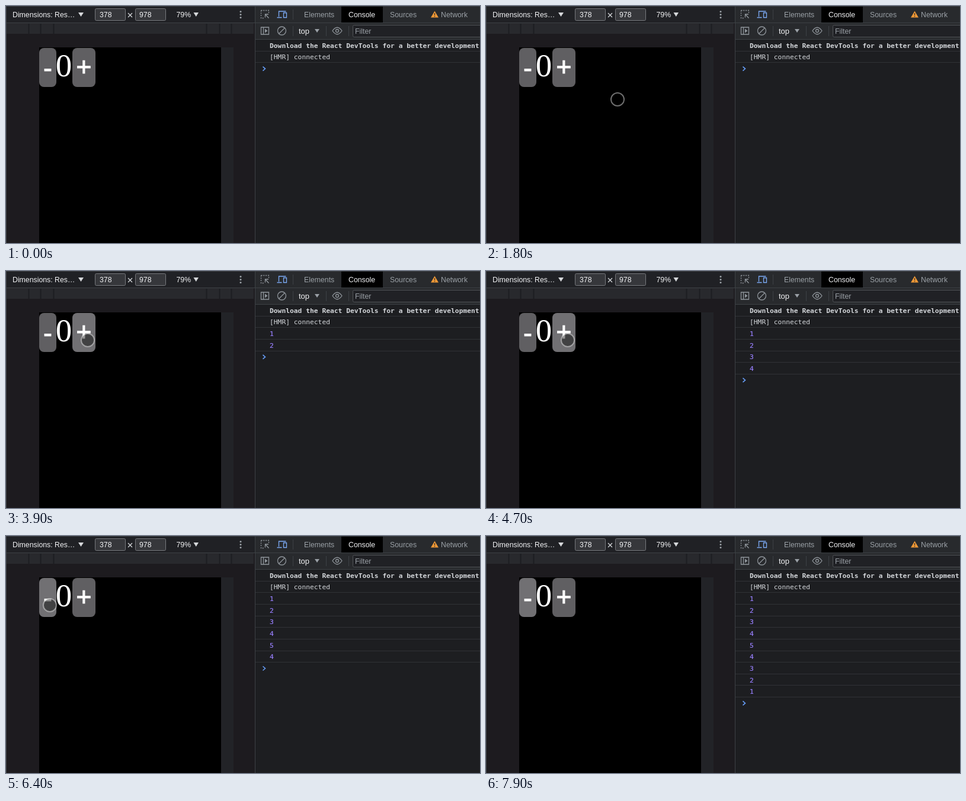
An HTML page that plays this animation: 800x401 px, repeating every 8 s.

```html
<!DOCTYPE html>
<html lang="en">
<head>
<meta charset="utf-8">
<title>Counter with console</title>
<style>
  html, body { margin: 0; width: 100%; height: 100%; overflow: hidden; background: #1d1b1f; }
  svg { display: block; width: 800px; height: 401px; }
  text { font: 12.3px "Liberation Sans", Arial, sans-serif; fill: #f1f2f4; white-space: pre; }
  .dim { fill: #9aa0a6; }
  .mono { font: 11.3px "DejaVu Sans Mono", monospace; fill: #d3d6da; }
  .bold { font-weight: bold; }
  .num { fill: #9980ff; stroke: #9980ff; stroke-width: .2; }
  .count { font: 55px "Liberation Serif", serif; fill: #fff; text-anchor: middle; }
  .sign { font-size: 45px; fill: #fff; stroke: #fff; stroke-width: .9; text-anchor: middle; }
  .line { stroke: #3d4145; fill: none; }
  .row { stroke: #303236; }
  .icon { stroke: #8f959b; stroke-width: 1.3; fill: none; }
  .blue { stroke: #7cacf8; }
</style>
</head>
<body>
<svg viewBox="0 0 800 401">
  <!-- device panel -->
  <rect width="420" height="401" fill="#1d1b1f"/>
  <rect width="420" height="29" fill="#202125"/>
  <rect y="29" width="418" height="18" fill="#28292d"/>
  <path d="M38.5 30v17M58.5 30v17M80.5 30v17M338.5 30v17M360.5 30v17M380.5 30v17" stroke="#1d1e22" stroke-width="2"/>
  <path class="line" d="M0 28.5H420M.5 0V401"/>
  <text x="11" y="19">Dimensions: Res…</text>
  <path d="M122 11h9l-4.5 7zM316.5 11h8.5l-4.25 7z" fill="#d5d7da"/>
  <g fill="#36373b" stroke="#77797d">
    <rect x="150.5" y="4.5" width="51" height="20" rx="2"/>
    <rect x="218.5" y="4.5" width="51" height="20" rx="2"/>
  </g>
  <text x="158" y="19">378</text>
  <text x="225" y="19">978</text>
  <path d="M206 12l7 7m0-7l-7 7" stroke="#d5d7da" stroke-width="1.3"/>
  <text x="287.5" y="19">79%</text>
  <g fill="#9aa0a6">
    <circle cx="396" cy="9.5" r="1.5"/><circle cx="396" cy="14.5" r="1.5"/><circle cx="396" cy="19.5" r="1.5"/>
  </g>

  <!-- page -->
  <rect x="56" y="70" width="307" height="331"/>
  <rect x="363" y="70" width="21" height="331" fill="#222327"/>
  <rect id="minus" x="56" y="71" width="29" height="66" rx="8"/>
  <rect id="plus" x="112" y="71" width="39" height="66" rx="8"/>
  <text class="sign" x="70.5" y="120">-</text>
  <text class="count" x="97.5" y="118.5">0</text>
  <text class="sign" x="131.5" y="117.5">+</text>
  <circle id="touch" r="11" fill="#000" fill-opacity=".42" stroke="#fff" stroke-opacity=".43" stroke-width="2"/>

  <!-- developer tools -->
  <rect x="420" width="380" height="401" fill="#1d1e21"/>
  <rect x="420" width="380" height="57" fill="#282a2d"/>
  <rect x="566" width="70" height="28" fill="#000"/>
  <path class="line" d="M0 .5H800M420 28.5H800M420 56.5H800M420.5 0V401M484.5 6v17M484.5 34v17M540.5 34v17M578.5 34v17"/>
  <path class="icon" d="M430.5 7.5h13v6M430.5 7.5v13h6" stroke-dasharray="2 1.8"/>
  <path class="icon" d="M437.5 19.5v-5.5h5.5M438 14.500l5.500 6"/>
  <path class="icon blue" d="M460.5 18V9h12M457.5 19.5h8M468.5 11.5h5v8h-5z"/>
  <text class="dim" x="503" y="19">Elements</text>
  <text x="578" y="19">Console</text>
  <text class="dim" x="648" y="19">Sources</text>
  <text class="dim" x="734" y="19">Network</text>
  <path d="M723.5 8.5l6.5 11h-13z" fill="#ee9836"/>
  <path d="M723.5 12v3.5M723.5 16.8v1.4" stroke="#282a2d" stroke-width="1.3"/>
  <path class="icon" d="M430.5 36h13v12h-13zM434.5 36v12"/>
  <path d="M437 38.5l4.5 3.5l-4.5 3.5z" fill="#8f959b"/>
  <g class="icon"><circle cx="465.5" cy="42" r="7"/><path d="M460.5 47l10-10"/></g>
  <text x="494" y="46.5" style="font-size:13px">top</text>
  <path d="M521 39h8l-4 6z" fill="#9aa0a6"/>
  <path class="icon" d="M551 42q8-11.5 16 0q-8 11.5-16 0z"/>
  <circle class="icon" cx="559" cy="42" r="2.5"/>
  <rect x="585.5" y="32.5" width="220" height="20" rx="2" fill="#202125" stroke="#505357"/>
  <text class="dim" x="589" y="47.3">Filter</text>
  <g id="log"></g>
  <path id="prompt" d="M433.5-3.5l4 3.5l-4 3.5" fill="none" stroke="#669df6" stroke-width="1.6"/>
</svg>
<script>
const LOOP = 8000, STEP = 100, ROW = 19.65, TOP = 66.8;
const $ = id => document.getElementById(id);

// time, printed value
const taps = [[3200, 1], [3700, 2], [4300, 3], [4700, 4], [5200, 5],
              [6200, 4], [6500, 3], [6800, 2], [7200, 1]];
const PLUS_AT = 3200, MINUS_AT = 6200;

// time, x, y
const path = [[500, 232, 178], [600, 210, 136], [900, 222, 158], [1900, 222, 158],
              [2400, 138, 117], [5400, 138, 117], [5900, 74, 117], [7300, 74, 117],
              [7800, 110, 250]];

function addRow(i, text, kind) {
  const row = document.createElementNS("http://www.w3.org/2000/svg", "g");
  const y = TOP + i * ROW;
  const edge = Math.floor(y + 9.3) + .5;
  row.innerHTML = `<text class="mono ${kind}" x="445" y="${y + 4}">${text}</text>` +
                  `<path class="line row" d="M421 ${edge}H800"/>`;
  $("log").append(row);
  return row;
}

addRow(0, "Download the React DevTools for a better development", "bold");
addRow(1, "[HMR] connected", "");
const rows = taps.map(([, value], i) => addRow(i + 2, value, "num"));

function touchAt(t) {
  const i = path.findIndex(p => p[0] > t);
  if (i < 1) return null;
  const [t0, x0, y0] = path[i - 1], [t1, x1, y1] = path[i];
  const u = (t - t0) / (t1 - t0), k = u * u * (3 - 2 * u);
  return [x0 + (x1 - x0) * k, y0 + (y1 - y0) * k];
}

function draw(now) {
  const t = Math.floor(now % LOOP / STEP) * STEP;
  const shown = taps.filter(([at]) => at <= t).length;
  rows.forEach((row, i) => row.setAttribute("visibility", i < shown ? "visible" : "hidden"));
  $("prompt").setAttribute("transform", `translate(0 ${TOP + (shown + 2) * ROW})`);

  const fill = lit => lit ? "#717073" : "#605f62";
  $("plus").setAttribute("fill", fill(t >= PLUS_AT && t < MINUS_AT));
  $("minus").setAttribute("fill", fill(t >= MINUS_AT));

  const pos = touchAt(t);
  $("touch").setAttribute("visibility", pos ? "visible" : "hidden");
  if (pos) $("touch").setAttribute("transform", `translate(${pos})`);
}

const start = performance.now();
function tick() {
  draw(performance.now() - start);
  requestAnimationFrame(tick);
}
tick();
</script>
</body>
</html>
```
